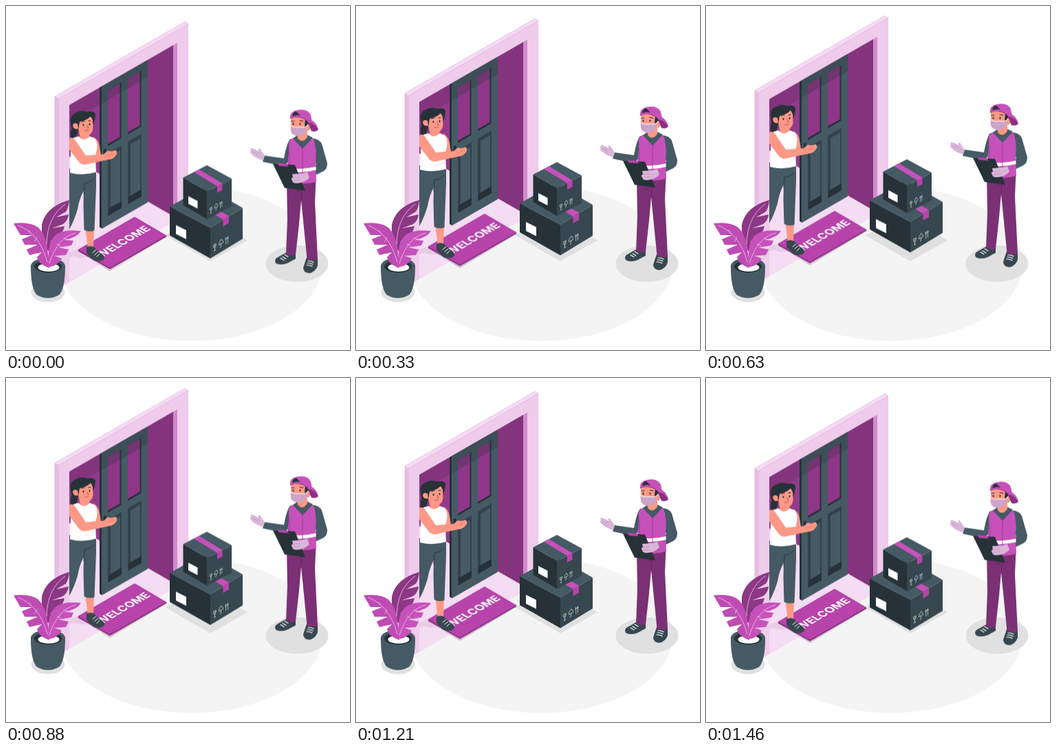
Write an HTML page that moves like this. It is 500 by 500 pixels and loops after 1500 ms.

```html
<!DOCTYPE html>
<html lang="en">
<head>
<meta charset="utf-8">
<title>Doorstep delivery</title>
<style>
  html, body { margin: 0; width: 100%; height: 100%; overflow: hidden; background: #fff; }
  svg { display: block; width: 100vw; height: 100vh; }
  .ink { fill: #263238; } .slate { fill: #455a64; } .steel { fill: #37474f; }
  .plum { fill: #84347c; } .pink { fill: #c651ba; } .mag { fill: #b743ab; }
  .skin { fill: #fb9986; } .glove { fill: #d9b6d8; } .pale { fill: #f4dcf2; }
  .frame { fill: #efcbec; } .shade { fill: #e0e0e0; } .white { fill: #fff; }
  .line { fill: none; stroke-linecap: round; stroke-linejoin: round; }
  text { font: 700 16px Inter, Roboto, sans-serif; fill: #fff; text-anchor: middle; }
</style>
</head>
<body>
<svg viewBox="0 0 500 500">
  <defs>
    <clipPath id="opening"><path d="M91.500 100H300V420H91.500z"/></clipPath>
    <g id="marks" class="line" stroke="#cfd8dc" stroke-width=".7">
      <path d="M-2-4h4l-.5 4q-1.500 2-3 0zM0 1v4M-1.500 5h3M-.5-4l1 2-1 2"/>
      <path d="M6.500 0q.5-5 3.500-5t3.500 5zM10 0v4q0 1.500-1.500 1M10-5v-1"/>
      <path d="M18 5v-9m-1 2l1-2 1 2M21 5v-9m-1 2l1-2 1 2"/>
    </g>
  </defs>

  <ellipse cx="269" cy="374.500" rx="191" ry="112.500" fill="#f4f4f4"/>
  <ellipse class="shade" cx="423" cy="374.500" rx="45.500" ry="26.500"/>
  <ellipse class="shade" cx="61" cy="416" rx="24.500" ry="14.500"/>
  <path class="shade" d="M231 333L297 371 351 340.500 290 305z"/>

  <g class="float" id="door">
    <path class="pale" d="M71 131L260 22.500 265 25.500V301L85 405 71 399z"/>
    <path fill="#e8bde4" d="M71 131L77 134V408L71 399z"/>
    <path class="frame" d="M77 134L265 25.500V301L249 310V53L92 143.500V401L77 409z"/>
    <path class="line" stroke="#dfa5da" stroke-width=".6" d="M71 398V131L260 22.500 265 25.500 77 134"/>
    <path class="pale" d="M92 215L249 300V310L92 401z"/>
    <path class="plum" d="M92 143.500L243 56.500V305L92 218z"/>
    <path fill="#933a8a" d="M92 168.500L137 142.500V244L92 218z"/>
    <path fill="#d18acb" d="M243 56.500L249 53V309L243 305z"/>
    <path class="ink" d="M136 118.200L139.500 116.200V323L136 321z"/>
    <path class="slate" d="M139 116.500L206 78V285L139 323.500z"/>
    <g id="panes"></g>
    <path fill="#263238" opacity=".28" d="M139 116.500L206 78V103L139 141.500z"/>
    <path class="ink" d="M141.500 209q2-3 4-1.500 1 3-1 5v8h-2.500z"/>
    <path fill="#d9bcd7" opacity=".5" d="M92 359Q104 351 118 355L122 364 107 366Q99 361 92 365z"/>
  </g>

  <g class="float" id="mat">
    <path fill="#d4c3d3" d="M103 355L187 308 235 334 151 385z"/>
    <path fill="#87317f" d="M105 353.500L187 306 233 333V335L151 382 105 356z"/>
    <path class="mag" d="M105 353.500L187 306 233 333 151 380z"/>
    <text transform="matrix(.866 -.5 .866 .5 170 342)" y="5.800">WELCOME</text>
  </g>

  <g class="float" id="woman">
    <g clip-path="url(#opening)">
      <path class="skin" d="M127 190Q134 193 136 203L138 216 133 220 126 205z"/>
      <path class="ink" d="M99 174Q93 178 94 186 92 190 97 192 103 191 104 184L104 172z"/>
      <path class="slate" d="M92 238H117L113 268Q107 278 104 295 99 312 92 324z"/>
      <path class="skin" d="M115 322H128L127 352 119 352z"/>
      <path class="slate" d="M92 236H131V262L128.500 326Q121 329 113.500 325L112.500 290 113 266 92 256z"/>
      <path class="line" stroke="#263238" stroke-width=".8" d="M128 250q-4 6-14 7l-1 16"/>
      <path class="skin" d="M106 182H122L121 191Q117 198 108 192z"/>
      <path class="white" d="M98 191L106 189Q112 198 122 189L129 192Q134 199 132 209L130 218 131 241Q112 247 93 242L94 212z"/>
      <path class="line" stroke="#dcdcdc" stroke-width=".7" d="M131 212q-4 5-9 6M129 231q-8 5-15 5"/>
      <path class="skin" d="M92 192Q97 189 101 195L116 217 142 215 148 210Q154 212 159 209 162 211 161 215 156 223 148 223L116 230Q109 231 105 225L92 208z"/>
      <path class="line" stroke="#e57f70" stroke-width=".8" d="M145 216l5 1 5-4m-5 4l8-2"/>
      <path class="skin" d="M104 166Q109 159 121 159L126 163 126.500 178Q125 187 117 187.500 108 187 105 179z"/>
      <path class="ink" d="M94 170Q92 158 102 154.500 109 150 118 153.500 126 151 130 156 130 165 126.500 172 127 165 123 160 117 166 107 168L105 180 101 185Q94 179 94 170z"/>
      <path class="skin" d="M104 171Q98 168 97 173 98 180 105 178z"/>
      <g class="line" stroke="#263238" stroke-width="1"><path d="M110 168q2-2 4-1M120 166.500l3 0"/><path d="M112.500 172v1M121.500 171v1" stroke-width="2"/></g>
      <path class="line" stroke="#c34e51" stroke-width=".9" d="M118 173l2 4-2 0M114 180.500q3 2 6-1"/>
      <path class="steel" d="M117 350Q123 347 128 350L136 358Q144 361 143 367 137 373 127 369L117 359z"/>
      <path class="line" stroke="#fff" stroke-width="1" d="M126 358l5-4M129 361l5-4M132 364l4-4"/>
    </g>
  </g>

  <g class="float" id="boxes">
    <path class="slate" d="M238 291L290 262 344 293 297 322z"/>
    <path class="ink" d="M238 291L297 322V366.500L238 333z"/>
    <path class="steel" d="M297 322L344 293V338L297 366.500z"/>
    <path class="pink" d="M304 303L312 298 324 304.500 315.500 310z"/>
    <path class="mag" d="M315.500 310L324 304.500V315L315.500 320z"/>
    <path class="white" d="M247 318L262 325.500V338.500L247 331z"/>
    <use href="#marks" transform="matrix(.9 -.52 0 1 303.500 350)"/>
    <path class="slate" d="M257.500 249L292 231 328 250.500 292.500 269z"/>
    <path class="ink" d="M257.500 249L292.500 269V309.500L257.500 289z"/>
    <path class="steel" d="M292.500 269L328 250.500V290.500L292.500 309.500z"/>
    <path class="pink" d="M273 241L280.500 237 314.500 257.500 307 261.500z"/>
    <path class="mag" d="M307 261.500L314.500 257.500V267L307 271z"/>
    <path class="white" d="M265 276L278.500 283V294L265 287z"/>
    <use href="#marks" transform="matrix(.75 -.42 0 .87 298 296)"/>
  </g>

  <g class="float" id="courier">
    <path class="steel" d="M407 358L421 360V367Q415 370 410 373 401 377 393 374 389 370 393 366z"/>
    <path class="steel" d="M437 365L453 366V377Q450 386 441 388 432 387 432 380z"/>
    <path class="line" stroke="#fff" stroke-width="1.200" d="M405 361l5 3M402 364l5 3M399 366l5 3M439 370q5 0 8 2M438 373q5 0 8 2M437 376q5 0 8 2"/>
    <path fill="#7b3075" d="M408 252H450.500L449 285 453 368Q445 371 437.500 367L429 282 426 316 421 361Q414 364 407 360L409 310z"/>
    <path class="line" stroke="#5c2158" stroke-width=".8" d="M430 262l-1 20M422 270q5 0 8-5"/>
    <path class="slate" d="M413 193Q408 199 404 221L376 217 373 226 397 231Q409 232 414 221L421 194z"/>
    <path class="slate" d="M444 192Q455 192 459 200L467 228Q467 237 461 240L440 250 436 242 451 230 446 215z"/>
    <path class="pink" d="M414 193L421 190Q431 202 443 190L448 195Q452 213 450 226L451 255Q432 261 411 255L409 230Q412 212 411 198z"/>
    <path class="white" d="M412 235Q431 238 450.500 233V238Q431 243 412 240z"/>
    <path class="slate" d="M417 192L424 187Q432 192 438 187L446 191 431 207z"/>
    <path class="line" stroke="#9b368f" stroke-width=".8" d="M431 207V256M412 211v18"/>
    <path class="skin" d="M423 181H438V190Q431 200 424 192z"/>
    <path class="glove" d="M376 217L369 207Q366 205 367 211L358 206Q354 206 356 210 353 211 357 215 363 221 373 224z"/>
    <path class="line" stroke="#b98bb7" stroke-width=".7" d="M358 211l7 4M361 208l6 5"/>
    <path class="ink" d="M388 229L420 230.500 435 268 405 264z"/>
    <path class="mag" d="M394 228L408 229 411 233 397 232z"/>
    <path class="glove" d="M416 244L431 243 438 241 441 249Q435 256 425 257 416 258 416 253 413 250 417 249z"/>
    <path class="line" stroke="#b98bb7" stroke-width=".7" d="M417 249l10-1M418 253l9-1"/>
    <path class="skin" d="M414 162H438L439 177Q436 189 426 189 415 188 414 180z"/>
    <path class="ink" d="M435 163L444 166Q446 176 439 181L434 174z"/>
    <path class="skin" d="M436 174Q441 169 443 175 441 182 436 180z"/>
    <path fill="#cda4ca" d="M413.500 174Q421 177 426 175.500 432 177 437 175L436 183Q430 189 423 188 415 187 414 181z"/>
    <path class="line" stroke="#fff" stroke-width="1" d="M414 174q7 3 12 1.500 6 1.500 11-1l2-3"/>
    <path class="line" stroke="#263238" stroke-width="1.100" d="M415 167l4 0M427 166l5 1"/>
    <path class="line" stroke="#263238" stroke-width="2" d="M417.500 170.500v1M427.500 170.500v1"/>
    <path class="pink" d="M443 165Q451 168 454 179L446 177 440 168z"/>
    <path fill="#8b3083" d="M439 168Q448 170 454 179 451 183 444 181.500 441 175 439 168z"/>
    <path class="pink" d="M413 163Q412 153 423 151 438 148 443 158L445 168 440 170Q438 166 434 164.500 423 159 413 163z"/>
    <path class="ink" d="M416 160Q417 153 422 153L428 159Q422 157 416 160z"/>
    <path class="line" stroke="#913087" stroke-width=".8" d="M413 163q12-5 23 2l4 5"/>
  </g>

  <g id="plant">
    <path class="slate" d="M36 378C36 400 39 414 45 420Q61 429 77 420C83 414 86 400 86 378z"/>
    <ellipse class="slate" cx="61" cy="378" rx="25" ry="12"/>
    <ellipse class="ink" cx="61" cy="378.500" rx="20" ry="9"/>
    <ellipse class="white" cx="62" cy="380" rx="15.500" ry="6"/>
    <path fill="#8c3884" d="M58 352Q51 337 52 318 56 300 73 290 81 285 92 282 91 293 87 299L73 307 91 303Q90 312 83 317L67 323 85 320Q83 331 74 335L65 342 65 360z"/>
    <path fill="#bf4cb3" d="M11 316Q35 313 47 322 57 332 60 350L63 381Q53 377 48 372L45 365 52 358 34 362 30 354 46 347 27 347 23 339 38 333 21 333z"/>
    <path class="pink" d="M109 327Q85 324 73 332 64 339 62 355L60 380 69 378Q78 373 81 367L70 363 87 362 91 354 76 351 95 348 98 341 85 340Q103 337 109 327z"/>
    <g class="line" stroke="#ecb8e6" stroke-width=".9">
      <path d="M18 319Q49 331 60 372M33 326l4 5M45 336l-3 6"/>
      <path d="M101 330Q75 336 63 374M84 337l5 2M74 346l6 3"/>
      <path d="M86 288Q60 306 59 346"/>
    </g>
  </g>
</svg>
<script>
  const SLOPE = 0.575;
  // Sheared panel: left edge x, top y at that edge, width, height
  const slab = (x, y, w, h, fill) => {
    const rise = w * SLOPE;
    return `<path fill="${fill}" d="M${x} ${y}l${w} ${-rise}v${h}l${-w} ${rise}z"/>`;
  };
  const glass = (x, y) =>
    slab(x, y, 19.5, 81, '#263238') + slab(x, y, 17.5, 78, '#903688');
  const panel = (x, y) =>
    slab(x, y, 20, 91, '#344148') + slab(x + 4, y + 3, 14, 78, '#455a64') +
    slab(x + 1, y + 80, 19, 10, '#263238');
  document.getElementById('panes').innerHTML =
    glass(148, 122) + glass(177, 105) + panel(148, 214) + panel(177, 197);

  // Linear rise and fall, then a short rest before the loop
  const steps = [[0, 0.4], [0.486, -9.6], [0.972, 0.4], [1, 0.4]];
  const bob = steps.map(([offset, y]) => ({ offset, transform: `translateY(${y}px)` }));
  for (const part of document.querySelectorAll('.float')) {
    part.animate(bob, { duration: 1500, iterations: Infinity, easing: 'linear' });
  }
</script>
</body>
</html>
```
